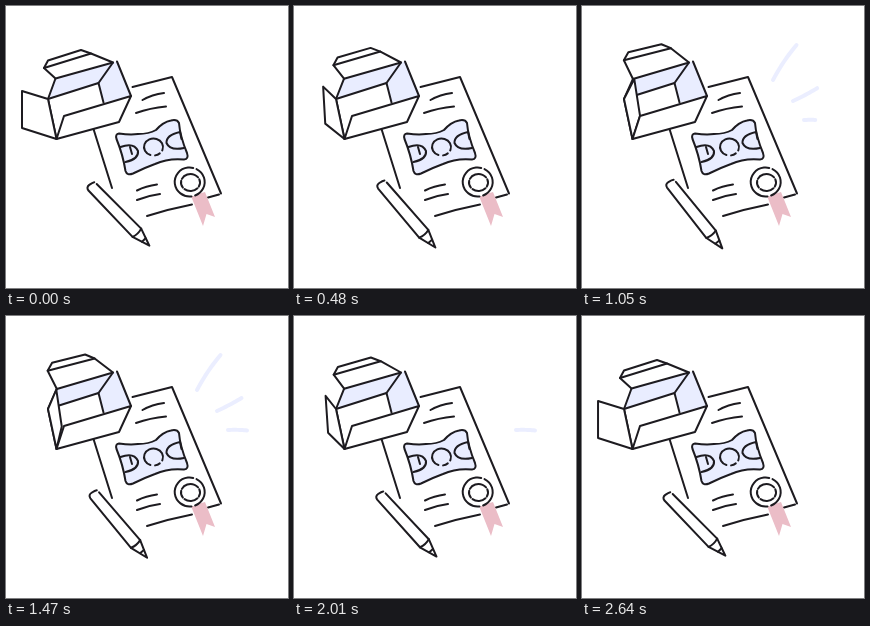
These frames come from a looping animation (282x282 px, 2.67 s). An HTML page with a canvas:

```html
<!DOCTYPE html>
<html lang="en">
<head>
<meta charset="utf-8">
<title>Box, certificate and pencil</title>
<style>
  html, body { margin: 0; width: 100%; height: 100%; overflow: hidden; background: #fff; }
  canvas { display: block; width: 100%; height: 100%; }
</style>
</head>
<body>
<canvas id="stage"></canvas>
<script>
const SIZE = 282, LOOP = 2670, STEP = 30;
const INK = '#1d1b20', LAVENDER = '#e9edff', RAY = '#ebeeff', PINK = '#ebbdc7', WHITE = '#fff';
const canvas = document.getElementById('stage');
const ctx = canvas.getContext('2d');

const clamp = v => Math.min(1, Math.max(0, v));
const ease = v => (1 - Math.cos(Math.PI * clamp(v))) / 2;
const mix = (a, b, p) => a.map((v, i) => v + (b[i] - v) * p);
// Rises until the peak, then falls back by the end of the loop.
const swing = (t, peak) => t < peak ? ease(t / peak) : 1 - ease((t - peak) / (LOOP - peak));

function paint(path, fill, stroke = INK, width = 2) {
  if (fill) { ctx.fillStyle = fill; ctx.fill(path); }
  if (stroke) { ctx.strokeStyle = stroke; ctx.lineWidth = width; ctx.stroke(path); }
}
function poly(points, fill, stroke = INK, closed = true) {
  const path = new Path2D();
  points.forEach(([x, y]) => path.lineTo(x, y));
  if (closed) path.closePath();
  paint(path, fill, stroke);
}
const line = (...points) => poly(points, null, INK, false);
const svg = (d, fill, stroke) => paint(new Path2D(d), fill, stroke);

function arc(x, y, rx, ry, from, to, fill, stroke) {
  const path = new Path2D();
  path.ellipse(x, y, rx, ry, 0, from, to);
  paint(path, fill, stroke);
}

function drawPaper() {
  svg('M126.500 81L166 71L215 187.500M213 188.500L202 191.500M186 198.500Q163 203 141 210M87.500 123L106 182');
  svg('M136.500 94Q146 88.500 158 87M130 107Q144 102 160 100.500');
  svg('M131 184.500Q140 180 151 178.500M131 194Q142 189.500 154 188');
}

function drawCandy() {
  svg('M113 127.500Q124 129 132 128Q143 128 150 124Q157 116 165 114.500Q171 113 173 117' +
      'Q174 130 181 147Q183 153 178 153.500Q162 152 149 158Q138 162 127 167.500' +
      'Q121 170 119.500 165Q117 149 110.500 133Q109 128 113 127.500Z', LAVENDER);
  svg('M114.500 141Q128 136 132 145Q133 153 119.500 156');
  svg('M174 126Q160 129 160.500 137Q164 145 178 142');
  svg('M124 141L126 148M174 126L175.500 133');
  arc(147.500, 141, 9.500, 8.500, 1.900, 6.700);
  arc(147.500, 141, 9.500, 8.500, 0.850, 1.400);
}

function drawSeal() {
  svg('M185 190L199 186L209 211L200.500 208L197 220Z', PINK, null);
  arc(183.700, 176, 15, 14.500, 0, 7, WHITE, null);
  arc(183.700, 176, 15, 14.500, -1.100, 1.200);
  arc(183.700, 176, 15, 14.500, 1.450, 4.950);
  [[-2.700, -0.650], [-0.400, 0.500], [0.750, 2.250], [2.500, 3.350]]
    .forEach(([from, to]) => arc(184.500, 176.500, 9.500, 8.500, from, to));
}

function drawBox(p) {
  const backLeft = mix([49.500, 72.500], [51, 73], p), backRight = [107, 56.500];
  const rimTop = [111, 55.500], rimFront = [125, 90];
  const hingeBack = [42, 93], hingeFront = [50.500, 133];
  const floorBack = [92.500, 77], floorFront = [97.500, 96.500];
  const frontLeft = [58, 110], foot = [113, 116];

  const foldLeft = mix([38, 62], [42, 54], p), foldRight = mix([85, 47.500], [89, 42], p);
  const lidLeft = mix([42, 54.500], [46.500, 46], p), lidRight = mix([75, 44], [79.500, 38], p);
  poly([hingeBack, floorBack, floorFront, frontLeft, hingeFront], WHITE, null);
  poly([backLeft, backRight, floorBack, hingeBack], LAVENDER, null);
  poly([backRight, rimTop, rimFront, floorFront, floorBack], LAVENDER, null);
  line(hingeFront, hingeBack, backLeft);
  line(hingeBack, floorBack, floorFront);
  line(backRight, floorBack);
  line(rimTop, rimFront);

  poly([backLeft, foldLeft, lidLeft, lidRight, foldRight, backRight], WHITE);
  line(foldLeft, foldRight);

  const flapTop = mix([16, 85], [53.500, 72.500], p), flapFoot = mix([16, 122], [59.500, 109.500], p);
  poly([hingeBack, flapTop, flapFoot, hingeFront], WHITE);
  poly([hingeFront, frontLeft, rimFront, foot], WHITE);
}

function drawPencil(p) {
  ctx.save();
  ctx.translate(114.200, 209.500);
  ctx.rotate((46 + 5.800 * p) * Math.PI / 180);
  svg('M-41 -5L24 -6L42 0L24 6L-40 5.500Q-44 5 -43.500 1Q-43 -4 -41 -5Z', WHITE, null);
  svg('M-39 -5L24 -6L42 0L24 6L-40 5.500Q-44 5 -43.500 1Q-43 -3 -42 -4.500');
  svg('M24 -6Q26 0 24 6M34 -2.500L34 2.500');
  ctx.restore();
}

const rays = [
  { from: [191, 74], bend: [201, 55], to: [214.500, 39], start: 630, end: 1670 },
  { from: [211, 95], bend: [224, 89], to: [235.500, 82], start: 745, end: 1840 },
  { from: [222, 114], bend: [232, 113.500], to: [241, 114.500], start: 870, end: 2010 }
];

function drawRay({ from, bend, to, start, end }, t) {
  const tail = clamp((t - end) / 170), head = clamp((t - start) / 310);
  if (head <= tail) return;
  const path = new Path2D();
  for (let i = 0; i <= 12; i++) {
    const s = tail + (head - tail) * i / 12;
    path.lineTo(...mix(mix(from, bend, s), mix(bend, to, s), s));
  }
  paint(path, null, RAY, 4);
}

function draw(t) {
  const w = Math.round(innerWidth * devicePixelRatio), h = Math.round(innerHeight * devicePixelRatio);
  if (canvas.width !== w || canvas.height !== h) { canvas.width = w; canvas.height = h; }
  ctx.setTransform(w / SIZE, 0, 0, h / SIZE, 0, 0);
  ctx.lineCap = ctx.lineJoin = 'round';
  ctx.fillStyle = WHITE;
  ctx.fillRect(0, 0, SIZE, SIZE);
  drawPaper();
  drawCandy();
  drawSeal();
  drawBox(swing(t, 1190));
  drawPencil(swing(t, 820));
  rays.forEach(ray => drawRay(ray, t));
}

const begin = performance.now();
function tick() {
  const t = (performance.now() - begin) % LOOP;
  draw(Math.floor(t / STEP) * STEP);
  requestAnimationFrame(tick);
}
tick();
</script>
</body>
</html>
```
